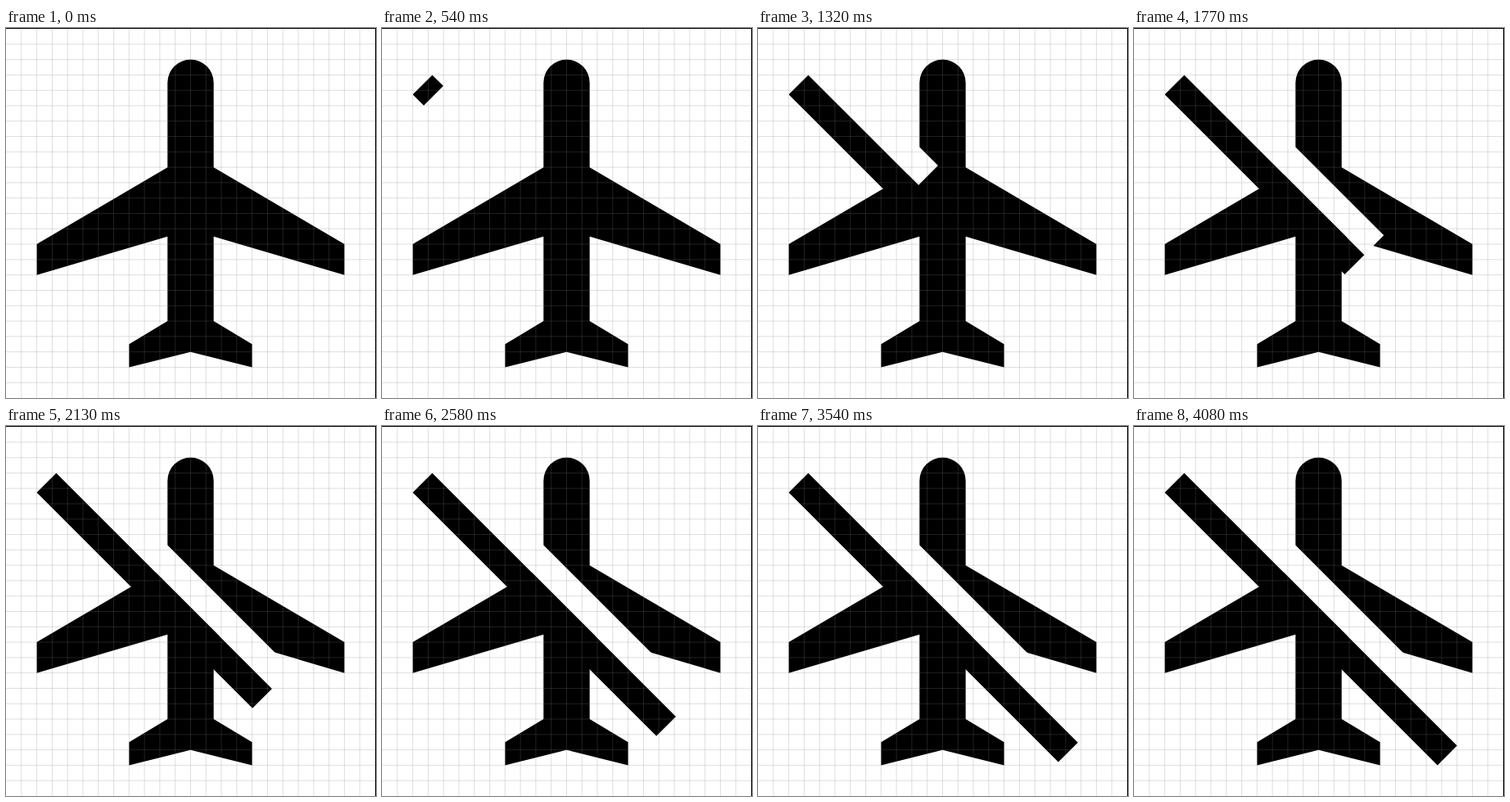
An HTML page for the animation above (4.17 s loop, 452 by 452 pixels).

```html
<!DOCTYPE html>
<html lang="en">
<head>
<meta charset="utf-8">
<title>Airplane mode</title>
<style>
  html, body { margin: 0; width: 100%; height: 100%; overflow: hidden; background: #fff; }
  svg { display: block; width: 100vw; height: 100vh; }
</style>
</head>
<body>
<svg viewBox="0 0 452 452">
  <rect width="452" height="452"/>
  <rect y="1" width="451" height="451" fill="#fff"/>
  <g transform="translate(0 1) scale(18.7917)">
    <path d="M10.5 9V3.5a1.5 1.5 0 0 1 3 0V9l8.5 5v2l-8.5-2.5V19l2.5 1.5V22l-4-1-4 1v-1.5l2.5-1.5v-5.5L2 16v-2z"/>
    <path id="gap" fill="#fff"/>
    <path id="slash"/>
    <path id="grid" fill="none" stroke="#808080" stroke-width=".05" stroke-opacity=".28"/>
  </g>
</svg>
<script>
  const LOOP = 4170, STEP = 30, START = 45, DURATION = 4068;
  const LENGTH = 17.73, THICKNESS = 1.27;
  const byId = id => document.getElementById(id);

  let lines = '';
  for (let i = 1; i < 24; i++) lines += `M${i} 0V24M0 ${i}H24`;
  byId('grid').setAttribute('d', lines);

  // cubic-bezier(.4, 0, .2, 1), solved by bisection
  function ease(x) {
    if (x <= 0) return 0;
    if (x >= 1) return 1;
    let low = 0, high = 1, s = 0.5;
    for (let i = 0; i < 30; i++) {
      s = (low + high) / 2;
      const bx = 1.2 * s * (1 - s) ** 2 + 0.6 * s * s * (1 - s) + s ** 3;
      if (bx < x) low = s; else high = s;
    }
    return s * s * (3 - 2 * s);
  }

  // Diagonal band growing down-right from its upper start corner
  const band = (x, y, d) =>
    `M${x} ${y}l${d} ${d} ${-THICKNESS} ${THICKNESS} ${-d} ${-d}z`;

  function render(time) {
    const t = Math.floor((time % LOOP) / STEP) * STEP;
    const d = LENGTH * ease((t - START) / DURATION);
    byId('gap').setAttribute('d', band(3.27 + THICKNESS, 3 - THICKNESS, d));
    byId('slash').setAttribute('d', band(3.27, 3, d));
  }

  const origin = performance.now();
  function tick() {
    render(performance.now() - origin);
    requestAnimationFrame(tick);
  }
  tick();
</script>
</body>
</html>
```
